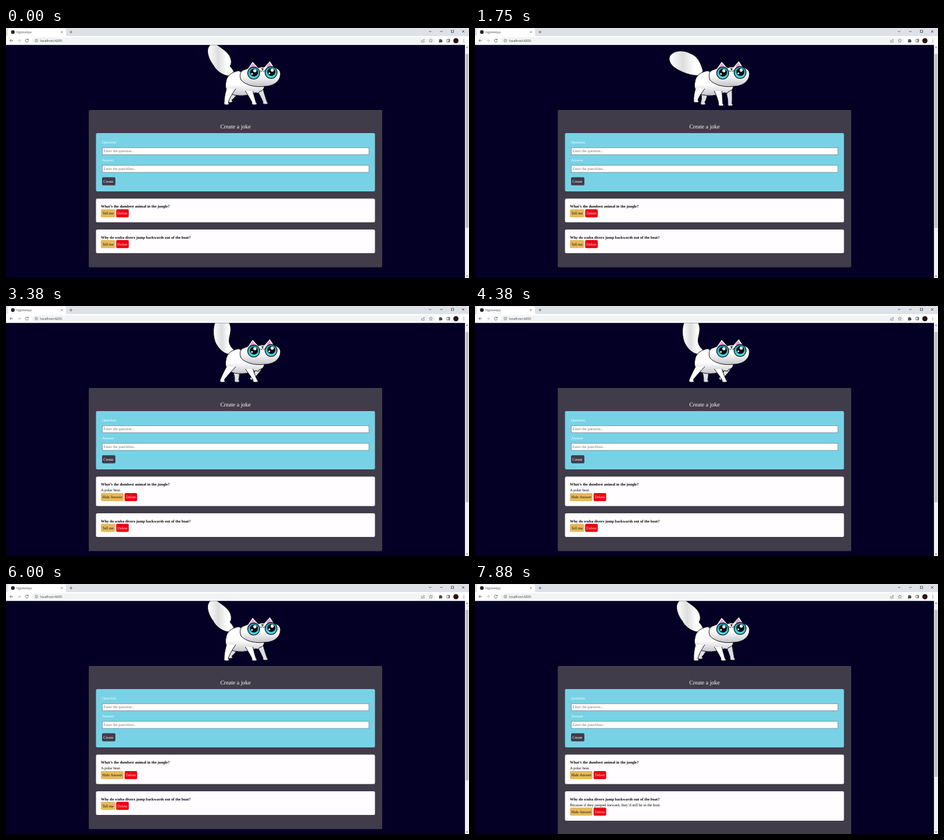
An HTML page for the animation above (8000 ms loop, 800 by 433 pixels).

```html
<!DOCTYPE html>
<html lang="en">
<head>
<meta charset="utf-8">
<title>NgJokeApp</title>
<style>
html, body { margin: 0; width: 100%; height: 100%; overflow: hidden; background: #040025; }
svg { display: block; width: 800px; height: 433px; }
text { font: 6.667px "Liberation Serif", "Times New Roman", serif; text-rendering: geometricPrecision; white-space: pre; }
.ui { font-family: "Open Sans", "Noto Sans", sans-serif; }
.icon { fill: none; stroke: #5f6368; stroke-width: .9; }

/* Answers open at 39% and 79.6% of the loop. */
.timed { animation: 8s step-end infinite; }
.pose { animation: pose 1s step-end infinite; }
.show1 { animation-name: show1; }
.hide1 { animation-name: hide1; }
.show2 { animation-name: show2; }
.hide2 { animation-name: hide2; }
.card1 { animation-name: card1; }
.card2 { animation-name: card2; }
.second { animation-name: second; }
.panel { animation-name: panel; }
.thumb { animation-name: thumb; }
@keyframes pose { 0% { visibility: visible } 12.5%, to { visibility: hidden } }
@keyframes show1 { 0% { visibility: hidden } 39%, to { visibility: visible } }
@keyframes hide1 { 0% { visibility: visible } 39%, to { visibility: hidden } }
@keyframes show2 { 0% { visibility: hidden } 79.6%, to { visibility: visible } }
@keyframes hide2 { 0% { visibility: visible } 79.6%, to { visibility: hidden } }
@keyframes card1 { 0% { height: 41px } 39%, to { height: 51px } }
@keyframes card2 { 0% { height: 41px } 79.6%, to { height: 51px } }
@keyframes second { 0% { transform: none } 39%, to { transform: translateY(10px) } }
@keyframes panel { 0% { height: 272.5px } 39% { height: 282.5px } 79.6%, to { height: 292.5px } }
@keyframes thumb { 0% { height: 301px } 39% { height: 295px } 79.6%, to { height: 289px } }
</style>
</head>
<body>
<svg viewBox="0 0 800 433">
  <defs>
    <clipPath id="page"><rect y="29.5" width="793" height="404"/></clipPath>
    <linearGradient id="fur" x2="0" y2="1">
      <stop offset=".55" stop-color="#fff"/><stop offset="1" stop-color="#c4c2c8"/>
    </linearGradient>
    <linearGradient id="fluff" x2="1">
      <stop stop-color="#fff"/><stop offset=".4" stop-color="#ddd"/><stop offset=".75" stop-color="#fff"/>
    </linearGradient>
    <linearGradient id="iris" x2="0" y2="1">
      <stop stop-color="#1593ad"/><stop offset="1" stop-color="#52dce8"/>
    </linearGradient>
  </defs>

  <rect y="29" width="800" height="404" fill="#040025"/>
  <g clip-path="url(#page)">
    <g id="cat" stroke="#111" stroke-width="1" stroke-linejoin="round"></g>
    <rect class="timed panel" x="143" y="142" width="507" height="272.5" rx="2" fill="#403c49"/>
    <text x="396.5" y="174" text-anchor="middle" fill="#fff" style="font-size:10px">Create a joke</text>
    <rect x="155.5" y="182" width="482" height="101" rx="2.5" fill="#77d2e6"/>
    <g fill="#fff">
      <text x="166" y="200">Question</text>
      <text x="166" y="231">Answer</text>
    </g>
    <g fill="#fff" stroke="#767676" stroke-width=".7">
      <rect x="166.4" y="207.3" width="460.6" height="12"/>
      <rect x="166.4" y="238" width="460.6" height="12"/>
    </g>
    <g fill="#757575">
      <text x="168.5" y="215.3">Enter the question...</text>
      <text x="168.5" y="246.2">Enter the punchline...</text>
    </g>
    <g id="create"></g>
    <g id="cards"></g>
  </g>

  <!-- scrollbar -->
  <rect x="793" y="29" width="7" height="404" fill="#f1f1f1"/>
  <rect class="timed thumb" x="794" y="45" width="5.2" height="301" fill="#c1c1c1"/>
  <path d="M795 34.2l1.6-2 1.6 2zM795 428.8l1.6 2 1.6-2z" fill="#505050"/>

  <!-- browser frame -->
  <rect width="800" height="14.5" fill="#dee1e6"/>
  <rect y="14" width="800" height="15.3" fill="#fff"/>
  <path d="M0 14.5Q3 14.5 3 11V3.5Q3 .8 6 .8H100.5Q103.5 .8 103.5 3.5V11Q103.5 14.5 106.5 14.5Z" fill="#fff"/>
  <circle cx="11.8" cy="7" r="3.2" fill="#25252a"/>
  <text class="ui" x="18" y="9" fill="#45494d" style="font-size:5.2px">NgJokeApp</text>
  <rect x="44.5" y="16" width="697.5" height="11.6" rx="5.8" fill="#f1f3f4"/>
  <text class="ui" x="59" y="23.9" fill="#33363a" style="font-size:5.6px">localhost:4200</text>
  <g class="icon">
    <path d="M95 5.5l3 3m0-3l-3 3M112.3 4.5v5m-2.5-2.5h5"/>
    <path d="M12 21.8H6.8m2.5-2.6L6.7 21.8l2.6 2.6"/>
    <path d="M20 21.8h5m-2.4-2.6l2.6 2.6-2.6 2.6" stroke="#b4b6b9"/>
    <path d="M38 20.2a2.6 2.6 0 1 0 .5 2.2M38.6 18.8v1.9h-2"/>
    <circle cx="52.5" cy="21.8" r="2.4" stroke-width=".7"/>
    <path d="M52.5 21.4v1.7m0-2.9v.6" stroke-width=".7"/>
    <path d="M718 20.7v3.6h5v-1.2M719.7 22.6q.5-2 3-2m-1.2-1.5l1.5 1.5-1.5 1.5" stroke-width=".7"/>
    <path d="M734 18.8l.9 2 2.2.2-1.7 1.5.5 2.2-1.9-1.2-1.9 1.2.5-2.2-1.7-1.5 2.2-.2z" stroke-width=".6"/>
    <rect x="761.8" y="19.4" width="5" height="4.8" rx=".4"/>
    <path d="M765.4 19.4v4.8" stroke-width="1.7"/>
    <g stroke="#26282b" stroke-width=".7">
      <path d="M730.8 5l2 2 2-2M750.3 6h4M788 4l4 4m0-4l-4 4"/>
      <rect x="769.6" y="4" width="3.8" height="3.8"/>
    </g>
  </g>
  <path d="M748 20h1.6a1.1 1.1 0 0 1 2.2 0h1.5v1.7a1.1 1.1 0 0 1 0 2.2v1h-5.3v-1.6a1.1 1.1 0 0 0 0-2z" fill="#4c5054"/>
  <circle cx="777.4" cy="22" r="4.5" fill="#2b1414"/>
  <g fill="#5f6368"><circle cx="791" cy="19.8" r=".65"/><circle cx="791" cy="22" r=".65"/><circle cx="791" cy="24.2" r=".65"/></g>
</svg>

<script>
const byId = id => document.getElementById(id);

function button(x, y, w, label, fill, color) {
  return `<rect x="${x}" y="${y}" width="${w}" height="14" rx="2" fill="${fill}"/>
    <text x="${x + 2.2}" y="${y + 9.3}" fill="${color}">${label}</text>`;
}

function buttons(y, label, w) {
  return button(164, y, w, label, '#e6b95b', '#17130c') +
    button(164 + w + 1.9, y, 21.7, 'Delete', '#ec0012', '#ffdce0');
}

function card(n, y, question, answer) {
  return `<rect class="timed card${n}" x="155.5" y="${y}" width="482" height="41" rx="2.5" fill="#fffdff"/>
    <text x="164" y="${y + 15.7}" font-weight="bold" style="font-weight:bold">${question}</text>
    <g class="timed hide${n}">${buttons(y + 18.4, 'Tell me', 24.5)}</g>
    <g class="timed show${n}"><text x="164" y="${y + 25.6}">${answer}</text>
      ${buttons(y + 28.4, 'Hide Answer', 39)}</g>`;
}

byId('create').innerHTML = button(166, 258.5, 23, 'Create', '#403c49', '#fff');
byId('cards').innerHTML =
  card(1, 295.5, 'What’s the dumbest animal in the jungle?', 'A polar bear.') +
  `<g class="timed second">${card(2, 348.9, 'Why do scuba divers jump backwards out of the boat?',
    'Because if they jumped forward, they’d still be in the boat.')}</g>`;

const tails = {
  mid: 'M391 82C380 86 364 76 358 64C350 54 346 40 350 33Q353 27 361 26C368 33 384 40 388 52Q391 61 387 66Q391 70 394 76Z',
  up: 'M393 82C380 88 366 74 361 61C357 48 358 34 363 24H383C391 36 388 45 386 55Q383 67 394 76Z',
  low: 'M390 82C374 84 355 76 344 68C334 60 333 49 341 44C350 38 362 39 372 44C385 49 390 60 394 75Z'
};

// Feet: near rear, far rear, near front, far front.
const poses = [
  { tail: 'mid', feet: [380, 132, 386, 128, 428, 132, 447, 131] },
  { tail: 'mid', feet: [381, 132, 391, 130, 414, 132, 444, 128], dip: 2 },
  { tail: 'up', feet: [376, 132, 396, 131, 422, 132, 434, 130], dip: 1 },
  { tail: 'up', feet: [373, 131, 398, 131, 430, 131, 425, 127] },
  { tail: 'mid', feet: [374, 129, 397, 131, 431, 125, 437, 130] },
  { tail: 'low', feet: [380, 121, 397, 134, 418, 133, 434, 135] },
  { tail: 'low', feet: [381, 128, 393, 132, 424, 134, 440, 134] },
  { tail: 'mid', feet: [381, 132, 388, 129, 428, 132, 444, 131] }
];

// A tapered leg, left open at the hip.
function leg(hx, hy, w, bend, fx, fy, fill) {
  const kx = (hx + fx) / 2 + bend, ky = (hy + fy) / 2 + 2, k = w * .6;
  return `<path fill="${fill}" d="M${hx - w} ${hy}Q${kx - k} ${ky} ${fx - 3} ${fy - 3}q-1 4 3 4h3q4-1 1-4
    Q${kx + k} ${ky} ${hx + w} ${hy}"/>`;
}

function eye(x, y) {
  return `<g stroke="none"><circle cx="${x}" cy="${y}" r="11" fill="#111"/>
    <circle cx="${x}" cy="${y}" r="9.8" fill="url(#iris)"/>
    <circle cx="${x + .5}" cy="${y - .8}" r="6.7" fill="#08080c"/>
    <circle cx="${x + 2}" cy="${y - 4}" r="2.7" fill="#fff"/>
    <circle cx="${x - 3}" cy="${y + 1.5}" r="1.5" fill="#fff"/></g>`;
}

const body = `<path fill="url(#fur)" d="M380 94C381 82 391 76 402 74L446 96C448 105 443 109 438 110l-2 3-5-1
  C418 118 400 119 388 114C380 109 378 101 380 94Z"/>`;

const head = `<path fill="url(#fur)" d="M413 72C404 74 403 82 406 90C414 99 430 103 446 101C462 101 473 93 474 81
  C475 74 470 70 463 68L456 57L446 68Q441 67 436 69L426 58L418 70Z"/>
  <path d="M420 70L426 61L434 69ZM449 67L455 60L461 68Z" fill="#e59bd2" stroke="none"/>` +
  eye(428, 78) + eye(458, 77) +
  `<path d="M441.5 70.5h3.4l-1.7 2z" fill="#333"/>
  <path d="M439 73.5q1.6 3.4 4.2 0q2.6 3.2 4.2-.3" fill="none"/>`;

function cat({ tail, feet: f, dip = 0 }, i) {
  return `<g class="pose" style="animation-delay:${(i - 8) * 125}ms">
    <path d="${tails[tail]}" fill="url(#fluff)"/>
    ${leg(396, 106, 7, 3, f[2], f[3], '#dedce6')}${leg(438, 105, 6, 2, f[6], f[7], '#dedce6')}
    ${body}
    ${leg(389, 105, 8, -3, f[0], f[1], '#fff')}${leg(420, 109, 6.5, 2, f[4], f[5], '#fff')}
    <g transform="translate(${dip / 3} ${dip})">${head}</g></g>`;
}

byId('cat').innerHTML = poses.map(cat).join('');
</script>
</body>
</html>
```
